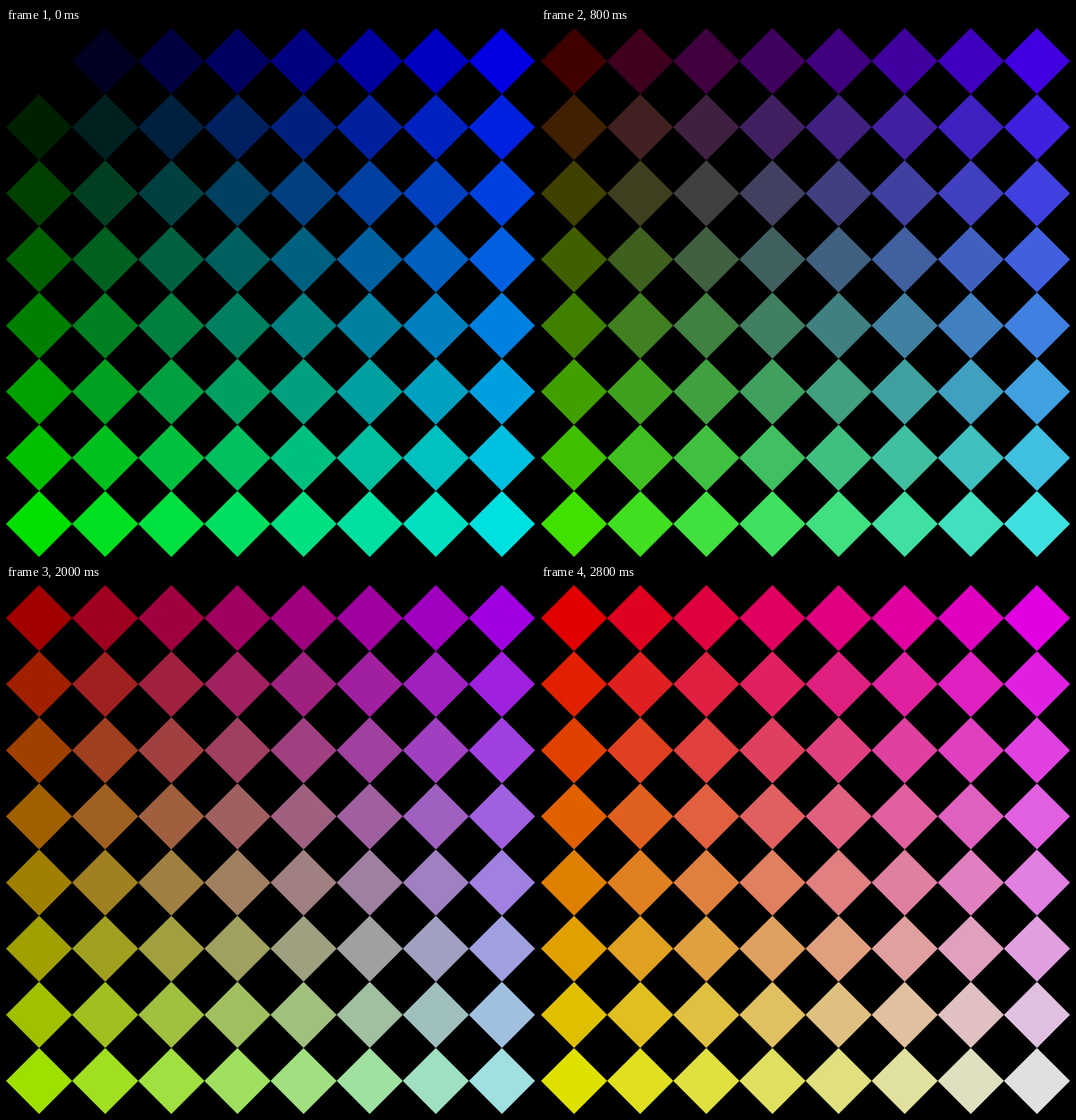
Write an HTML page that moves like this. It is 679 by 679 pixels and loops after 3.2 s.

```html
<!DOCTYPE html>
<html lang="en">
<head>
<meta charset="utf-8">
<title>Color cube slices</title>
<style>
  @property --red {
    syntax: "<integer>";
    inherits: true;
    initial-value: 0;
  }
  html, body {
    margin: 0;
    width: 100%;
    height: 100%;
    overflow: hidden;
    background: #000;
  }
  svg {
    display: block;
    width: 100%;
    height: 100%;
    animation: red 3200ms steps(8, end) infinite;
  }
  path { fill: rgb(var(--red), var(--green), var(--blue)); }
  @keyframes red {
    from { --red: 0; }
    to { --red: 256; }
  }
</style>
</head>
<body>
<svg id="grid" viewBox="0 0 679 679"></svg>
<script>
  const COUNT = 8;
  const LEVEL = 32;
  const cell = 679 / COUNT;
  const half = cell / 2;
  const grid = document.getElementById("grid");

  // Green grows downwards, blue grows to the right; red steps with time.
  for (let row = 0; row < COUNT; row++) {
    for (let col = 0; col < COUNT; col++) {
      const diamond = document.createElementNS(grid.namespaceURI, "path");
      diamond.setAttribute("d",
        `M${col * cell + half} ${row * cell}l${half} ${half}l${-half} ${half}l${-half} ${-half}z`);
      diamond.style.setProperty("--green", row * LEVEL);
      diamond.style.setProperty("--blue", col * LEVEL);
      grid.append(diamond);
    }
  }
</script>
</body>
</html>
```
